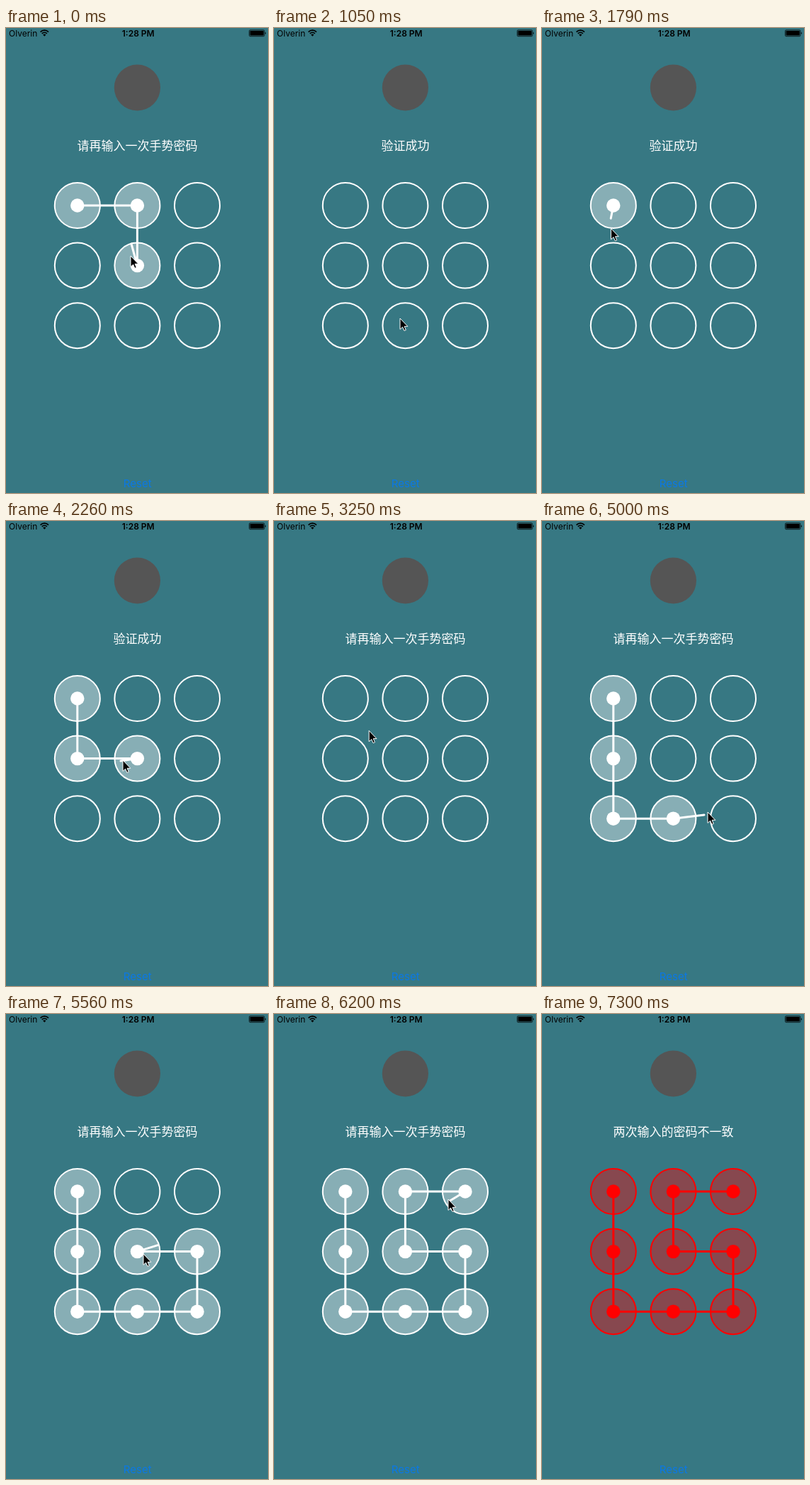
Write an HTML page that moves like this. It is 370x655 px and loops after 8.17 s.

```html
<!DOCTYPE html>
<html lang="zh">
<head>
<meta charset="utf-8">
<title>Gesture lock</title>
<style>
  html, body { margin: 0; width: 100%; height: 100%; overflow: hidden; background: #377883; }
  svg { display: block; width: 370px; height: 655px; }
  text { font-family: Inter, "Liberation Sans", sans-serif; }
  #title { font: 17px "Noto Sans CJK SC", "Noto Sans CJK", sans-serif; fill: #fff; }
  #pad { --ink: #fff; }
  #pad.wrong { --ink: #f00; }
  .ring { fill: none; stroke: #fff; stroke-width: 2; }
  .dot { fill: none; }
  .on .ring { fill: var(--ink); fill-opacity: .4; stroke: var(--ink); }
  .on .dot { fill: var(--ink); }
  #trail { fill: none; stroke: var(--ink); stroke-width: 3; stroke-linecap: round; stroke-linejoin: round; }
</style>
</head>
<body>
<svg viewBox="0 0 370 655">
  <rect width="370" height="655" fill="#377883"/>
  <text x="4" y="11.8" font-size="12">Olverin</text>
  <g fill="none" stroke="#000" stroke-width="1.7">
    <path d="M48.6 5.6a8 8 0 0 1 11.4 0M50.8 7.9a5 5 0 0 1 7 0"/>
    <path d="M54.3 11.8L52.2 9.6a3 3 0 0 1 4.2 0z" fill="#000" stroke="none"/>
  </g>
  <text x="186.7" y="11.8" font-size="12" font-weight="600" text-anchor="middle">1:28 PM</text>
  <rect x="343.5" y="2.9" width="21.4" height="8.8" rx="1.4" fill="none" stroke="#000" stroke-width=".8"/>
  <rect x="344.6" y="4" width="19.2" height="6.6" rx=".6"/>
  <path d="M365.8 5.6a2 2 0 0 1 0 3.4z"/>
  <circle cx="185.4" cy="84" r="32.6" fill="#555"/>
  <text id="title" x="185.5" y="172.3" text-anchor="middle"></text>
  <text x="185.7" y="647" font-size="15" text-anchor="middle" fill="#0a78e6">Reset</text>
  <g id="pad"><path id="trail"/></g>
  <path id="cursor" d="M0 0V15.4L3.6 12.2 5.9 17.4 8.3 16.4 6.1 11.3H10.8Z" stroke="#fff" stroke-width="1"/>
</svg>
<script>
const LOOP = 8170, TICK = LOOP / 141;
const $ = id => document.getElementById(id);
const pad = $('pad'), trail = $('trail'), title = $('title'), cursor = $('cursor');

// Pointer moves as [tick, x, y]; it rests between them.
const arrive = [[-1, 177, 304], [0, 176, 321], [6, 173, 409]];
const nudge = [[14, 174, 409]];
const goBack = [[18, 178, 409], [20, 160, 375], [27, 97, 244]];
const drawShort = [[29, 97, 254], [34, 98, 325], [38, 162, 338], [39, 165, 337], [41, 169, 336]];
const goStart = [[53, 162, 333], [60, 97, 245]];
const drawLong = [
  [62, 97, 258], [66, 100, 337], [68, 146, 346], [69, 142, 345], [74, 101, 406],
  [76, 112, 418], [81, 178, 414], [85, 229, 414], [86, 234, 410], [88, 250, 408],
  [92, 264, 315], [93, 255, 301], [96, 194, 338], [97, 186, 338], [101, 182, 263],
  [103, 218, 262], [105, 246, 266], [106, 247, 264], [107, 246, 261]
];
const leave = [[114, 238, 276], [118, 215, 360], [121, 235, 450], [126, 340, 670]];
const moves = [arrive, nudge, goBack, drawShort, goStart, drawLong, leave];

const strokes = [
  { from: 0, to: 10, nodes: [0, 1, 4] },
  { from: 29, to: 44, nodes: [] },
  { from: 62, to: 141, nodes: [] }
];
const titles = [
  [111, '两次输入的密码不一致'], [44, '请再输入一次手势密码'],
  [10, '验证成功'], [0, '请再输入一次手势密码']
];
const WRONG = 111, RELEASE = 106;

const nodes = Array.from({ length: 9 }, (_, i) => {
  const x = 100.8 + 84.6 * (i % 3), y = 250 + 84.6 * Math.floor(i / 3);
  const el = add('g', {}, pad);
  add('circle', { class: 'ring', cx: x, cy: y, r: 32 }, el);
  add('circle', { class: 'dot', cx: x, cy: y, r: 9.7 }, el);
  return { x, y, el };
});
pad.append(trail);

function add(tag, attrs, parent) {
  const el = document.createElementNS('http://www.w3.org/2000/svg', tag);
  for (const k in attrs) el.setAttribute(k, attrs[k]);
  return parent.appendChild(el);
}

function pointer(tick) {
  const move = moves.filter(m => m[0][0] <= tick).pop();
  const i = move.findIndex(p => p[0] > tick);
  if (i < 0) return move[move.length - 1].slice(1);
  const [t0, x0, y0] = move[i - 1], [t1, x1, y1] = move[i];
  const k = (tick - t0) / (t1 - t0);
  return [x0 + (x1 - x0) * k, y0 + (y1 - y0) * k];
}

// The touch trails the visible pointer by one tick.
const touch = tick => pointer(Math.min(tick - 1, RELEASE));

function picked(stroke, tick) {
  const list = [...stroke.nodes];
  for (let t = stroke.from; t <= Math.min(tick, RELEASE + 1); t++) {
    const [x, y] = touch(t);
    const hit = nodes.findIndex(n => Math.hypot(n.x - x, n.y - y) < 32);
    if (hit >= 0 && !list.includes(hit)) list.push(hit);
  }
  return list;
}

function draw(tick) {
  const stroke = strokes.find(s => tick >= s.from && tick < s.to);
  const list = stroke ? picked(stroke, tick) : [];
  const wrong = tick >= WRONG;
  const points = list.map(i => [nodes[i].x, nodes[i].y]);
  if (points.length && !wrong) points.push(touch(tick));
  trail.setAttribute('d', points.length ? 'M' + points.join('L') : '');
  nodes.forEach((n, i) => n.el.setAttribute('class', list.includes(i) ? 'on' : ''));
  pad.setAttribute('class', wrong ? 'wrong' : '');
  title.textContent = titles.find(([t]) => tick >= t)[1];
  cursor.setAttribute('transform', `translate(${pointer(tick)})`);
}

const start = performance.now();
let last = -1;
function frame() {
  const time = Math.max(0, performance.now() - start) % LOOP;
  const tick = Math.min(140, Math.floor(time / TICK + 0.26));
  if (tick !== last) draw(last = tick);
  requestAnimationFrame(frame);
}
frame();
</script>
</body>
</html>
```
